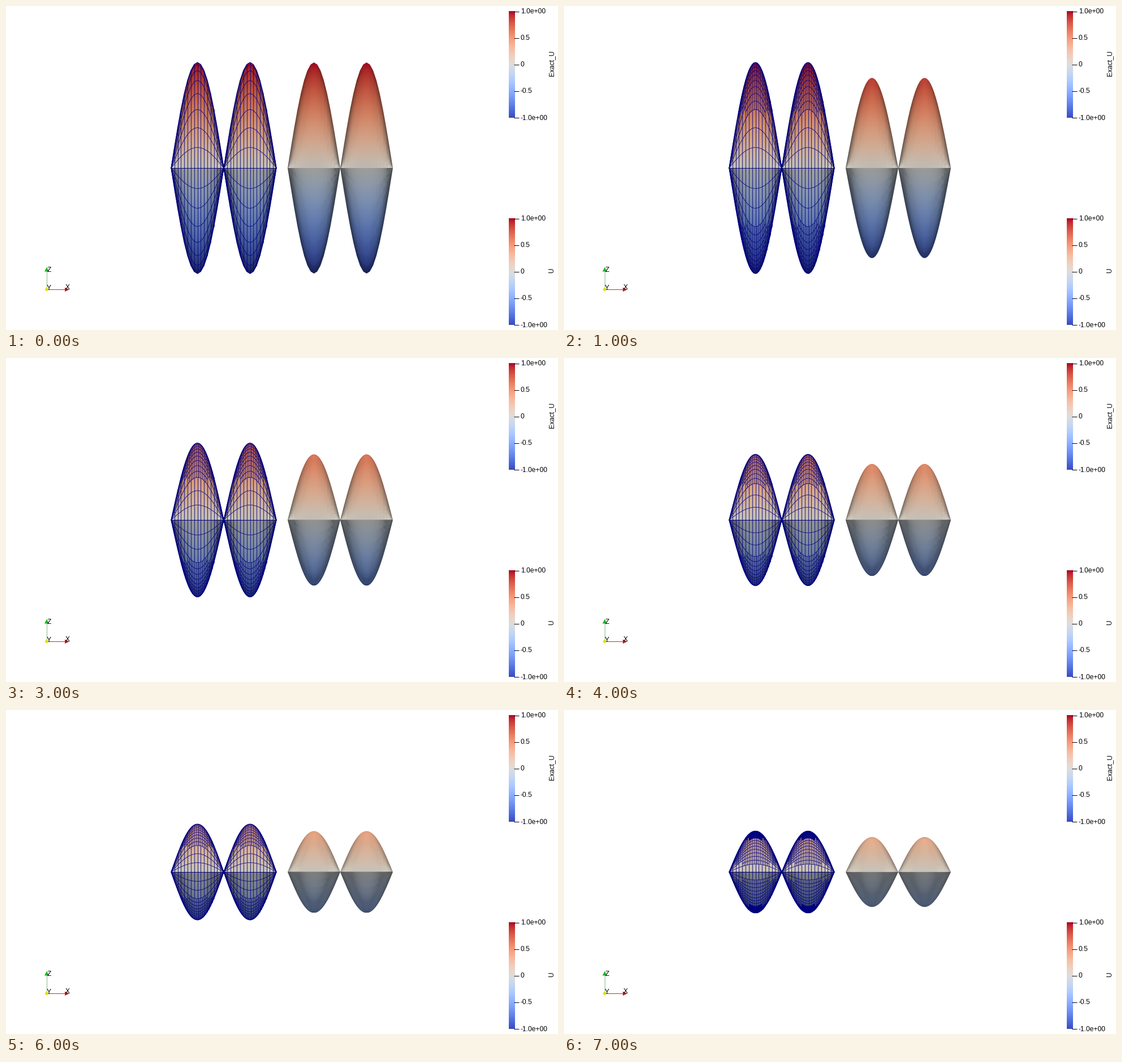
Write a matplotlib script that moves like this. It is 976 px wide and 574 px high and loops after 8 s.

```python
import numpy as np
import matplotlib.pyplot as plt
from matplotlib.animation import FuncAnimation
from matplotlib.collections import LineCollection
from matplotlib.patches import Circle, Polygon
from matplotlib.path import Path

W, H, DPI = 976, 574, 64
PT = 72 / DPI              # points per pixel
BASE, PEAK = 287.0, 187.0  # rest line and full height
LOBE = 93.0                # width of one lobe
DECAY = 0.158
N = 16                     # coarse cells across one lobe
NAVY = (0, 0, 0.5)
CMAP = plt.get_cmap("coolwarm")

# direction (right, front, up), strength, tint
LIGHTS = [
    ((0.0, 0.53, 0.848), 0.82, (1.0, 0.98, 0.92)),
    ((0.0, 0.5, -0.866), 0.33, (0.95, 0.98, 1.0)),
    ((0.0, 1.0, 0.0), 0.2, (1.0, 1.0, 1.0)),
    ((0.94, -0.34, 0.0), 0.25, (1.0, 1.0, 1.0)),
    ((-0.94, -0.34, 0.0), 0.25, (1.0, 1.0, 1.0)),
]


def wave(u, v):
    return np.sin(np.pi * u / N) * np.sin(np.pi * v / N)


def refinement(step):
    """Subdivisions of each coarse cell on the visible quarter of a lobe."""
    i, j = np.meshgrid(np.arange(N) + 0.5, np.arange(N // 2) + 0.5, indexing="ij")
    size = wave(i, j)
    level = np.ones(size.shape, int)
    if step >= 1:
        level[size > 0.5] = 2
    if step >= 7:
        level[size > 0.2] = 2
        level[size > 0.8] = 8
    return level


def gradient(u, v, level):
    """Slope of the surface, part smooth and part flat facets."""
    iu = np.clip(u.astype(int), 0, N - 1)
    iv = np.clip(v.astype(int), 0, N // 2 - 1)
    d = 1 / level[iu, iv]
    u0, v0 = np.floor(u / d) * d, np.floor(v / d) * d
    f00, f10 = wave(u0, v0), wave(u0 + d, v0)
    f01, f11 = wave(u0, v0 + d), wave(u0 + d, v0 + d)
    right = u - u0 > v - v0
    flat_u = np.where(right, f10 - f00, f11 - f01) / d
    flat_v = np.where(right, f11 - f10, f01 - f00) / d
    k = np.pi / N
    smooth_u = k * np.cos(k * u) * np.sin(k * v)
    smooth_v = k * np.sin(k * u) * np.cos(k * v)
    return (flat_u + smooth_u) * N, (flat_v + smooth_v) * N


def shade(amp, level, rows=220, cols=186):
    """Lit colours of two lobes, top half above bottom half."""
    u = (np.arange(cols) + 0.5) * N / cols
    h = (np.arange(rows) + 0.5) / rows
    u, h = np.meshgrid(u, h)
    ratio = np.clip(h / np.sin(np.pi * u / N), 0, 1)
    v = np.minimum(np.arcsin(ratio) * N / np.pi, N / 2 - 1e-6)
    gu, gv = gradient(u, v, level)
    gu, gv = gu * amp, gv * amp
    norm = np.sqrt(gu ** 2 + gv ** 2 + 1)
    halves = []
    for sign in (1, -1):
        light = np.zeros(u.shape + (3,))
        for (lx, lf, lz), power, tint in LIGHTS:
            dot = (-gu * lx + gv * lf + sign * lz) / norm
            light += power * np.maximum(dot, 0)[..., None] * np.array(tint)
        colour = CMAP(0.5 + 0.5 * sign * h * amp)[..., :3]
        halves.append(np.clip(colour * light, 0, 1))
    lobe = np.vstack([halves[0][::-1], halves[1]])
    return np.hstack([lobe, lobe])


def crest(level):
    """Crest nodes of one lobe."""
    parts = [np.linspace(i, i + 1, level[i, -1], endpoint=False) for i in range(N)]
    return np.append(np.concatenate(parts), N)


def outline(x0, amp, level):
    u = crest(level)
    x = np.concatenate([x0 + u * LOBE / N, x0 + LOBE + u * LOBE / N])
    z = np.tile(wave(u, N / 2), 2) * amp * PEAK
    return np.vstack([np.column_stack([x, BASE - z]),
                      np.column_stack([x, BASE + z])[::-1]])


def mesh(x0, amp, level):
    """Cell edges of both lobes, upper and lower side."""
    lines = []
    for i in range(N):
        for j in range(N // 2):
            n = level[i, j]
            t = np.linspace(0, 1, n + 1)
            for s in t[:-1]:
                lines.append((i + t, np.full(n + 1, j + s)))
                lines.append((np.full(n + 1, i + s), j + t))
    segments = []
    for u, v in lines:
        z = wave(u, v) * amp * PEAK
        for x in (x0, x0 + LOBE):
            for sign in (1, -1):
                segments.append(np.column_stack([x + u * LOBE / N, BASE - sign * z]))
    return segments


fig = plt.figure(figsize=(W / DPI, H / DPI), dpi=DPI, facecolor="white")
ax = fig.add_axes([0, 0, 1, 1])


def label(x, y, text, **kw):
    ax.text(x, y, text, family="Liberation Sans", size=12 * PT, color="black", **kw)


def colour_bar(top, title):
    ramp = np.linspace(1, 0, 256)[:, None]
    ax.imshow(ramp, cmap=CMAP, vmin=0, vmax=1, aspect="auto",
              extent=(889, 900, top + 188.5, top))
    for k, text in enumerate(["1.0e+00", "0.5", "0", "-0.5", "-1.0e+00"]):
        y = top + k * 47.125
        ax.plot([898, 907], [y, y], color="black", lw=PT, solid_capstyle="butt")
        label(910, y + 3.6, text, va="baseline")
    label(965.5, top + 92, title, rotation=90, ha="center", va="center")


def axes_marker():
    ax.plot([72, 72], [500, 470], color="#7fbf7f", lw=PT)
    ax.plot([74, 105], [502.3, 502.3], color="#c03030", lw=PT)
    ax.add_patch(Polygon([(68, 470.5), (76, 470.5), (72, 462.5)], color="#22b422", lw=0))
    ax.add_patch(Polygon([(104, 498.8), (104, 506), (112, 502.3)], color="#cc1010", lw=0))
    ax.add_patch(Circle((71.8, 502.3), 3, color="#e6e614", lw=0))
    for x, y, text in [(73, 471, "Z"), (72, 503, "Y"), (105, 502.5, "X")]:
        label(x, y, text, va="baseline")


class Surface:
    def __init__(self, x0, lag, wired):
        self.x0, self.lag = x0, lag
        self.image = ax.imshow(np.ones((2, 2, 3)), aspect="auto", zorder=2)
        self.wires = self.rim = None
        if wired:
            self.wires = LineCollection([], colors=[NAVY], linewidths=0.8 * PT, zorder=3)
            self.rim = LineCollection([], colors=[NAVY], linewidths=1.2 * PT, zorder=3)
            ax.add_collection(self.wires)
            ax.add_collection(self.rim)

    def update(self, step):
        amp = np.exp(-DECAY * max(step - self.lag, 0))
        level = refinement(step)
        edge = outline(self.x0, amp, level)
        reach = amp * PEAK
        self.image.set_data(shade(amp, level))
        self.image.set_extent((self.x0, self.x0 + 2 * LOBE, BASE + reach, BASE - reach))
        self.image.set_clip_path(Path(edge), ax.transData)
        if self.wires:
            self.wires.set_segments(mesh(self.x0, amp, level))
            half = len(edge) // 2
            self.rim.set_segments([edge[:half], edge[half:]])


colour_bar(9.5, "Exact_U")
colour_bar(376.5, "U")
axes_marker()
surfaces = [Surface(292, 1, True), Surface(498, 0, False)]


def draw(step):
    for surface in surfaces:
        surface.update(step)
    ax.set_xlim(0, W)
    ax.set_ylim(H, 0)
    ax.axis("off")
    return []


anim = FuncAnimation(fig, draw, frames=8, init_func=lambda: [], interval=1000, repeat=True)
plt.show()
```
